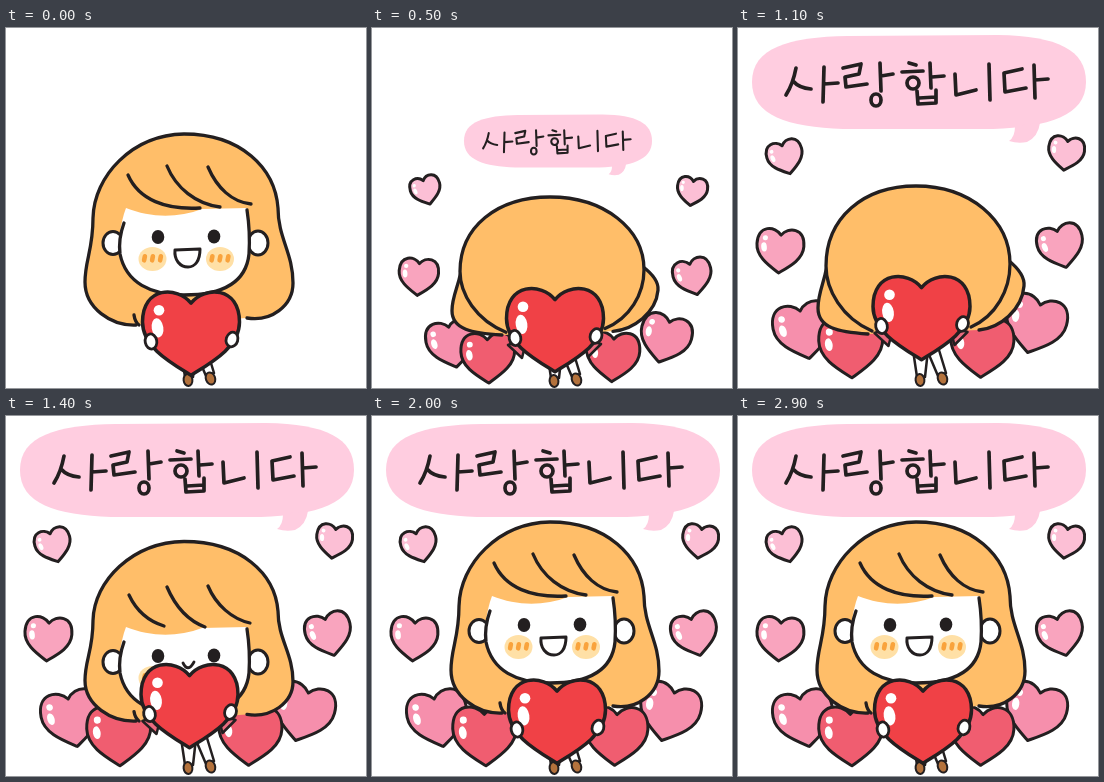
These frames come from a looping animation (360x360 px, 3.05 s). An HTML page with a canvas:

```html
<!DOCTYPE html>
<html lang="ko">
<head>
<meta charset="utf-8">
<style>
  html, body { margin: 0; width: 100%; height: 100%; overflow: hidden; background: #fff; }
  canvas { display: block; width: 360px; height: 360px; }
</style>
</head>
<body>
<canvas id="stage" width="360" height="360" role="img" aria-label="사랑합니다"></canvas>
<script>
const ctx = document.getElementById('stage').getContext('2d');
const INK = '#231f20', HAIR = '#ffbe69', PINK = '#ffcde0';
const LOOP = 3050, FIRST = 200, STEP = 150;

// top/bottom: vertical span of the hair; face: face offset; heart: heart centre
const POSES = {
  up:      { top: 106, bottom: 297, face: 0, heart: 305.5, x: 185 },
  stretch: { top: 100, bottom: 292, face: -6, heart: 299.5, x: 185 },
  half:    { top: 125.5, bottom: 305, face: 31, heart: 290, x: 183.5, shy: true },
  bow:     { top: 158, bottom: 306, heart: 290, x: 183.5, bowed: true },
  squash:  { top: 169, bottom: 307, heart: 302, x: 183, bowed: true }
};
const SEQUENCE = ['up', 'stretch', 'half', 'squash', 'bow', 'bow', 'bow', 'bow', 'squash', 'half', 'stretch', 'up'];

const HEART = new Path2D('M0-32C-14-50-50-50-50-12C-50 14-22 30 0 44C22 30 50 14 50-12C50-50 14-50 0-32Z');

// end position, start position, width, tilt in degrees, colour, sway direction
const HEARTS = [
  { x: 66, y: 303, x0: 80, y0: 316, w: 63, tilt: -11, color: '#f68fac', sway: 1 },
  { x: 297, y: 297, x0: 293, y0: 311, w: 64, tilt: 15, color: '#f68fac', sway: 1 },
  { x: 113, y: 320, x0: 116, y0: 330, w: 67, tilt: -2, color: '#f05d70', sway: -1 },
  { x: 244, y: 320, x0: 241, y0: 329, w: 66, tilt: 3, color: '#f05d70', sway: -1 },
  { x: 42, y: 223, x0: 46.5, y0: 249, w: 50, tilt: 4, color: '#f9a4be', sway: -1 },
  { x: 323, y: 218.5, x0: 321, y0: 249, w: 49, tilt: -14, color: '#f9a4be', sway: -1 },
  { x: 47.5, y: 129.5, x0: 54, y0: 162.5, w: 39, tilt: -16, color: '#fcbfd5', sway: 1 },
  { x: 328, y: 125.5, x0: 320, y0: 163.5, w: 39, tilt: 8, color: '#fcbfd5', sway: 1 }
];

const BUBBLE = 'M14 54C14 20 50 9 110 8L260 7C320 8 348 22 348 54C348 88 310 99 255 101L105 101C50 99 14 88 14 54Z';
const LETTERING = new Path2D(
  'M58 40Q55 56 48 67M55 53Q61 60 73 61M86 39L85 74M86 56L100 55' +
  'M105 40L123 36L121 46L107 49L108 59L129 56M142 35L143 63M143 48L155 46' +
  'M143 72A5 6 0 1 1 133 72A5 6 0 1 1 143 72' +
  'M171 35L178 37M164 44L185 43M181 55A6 6 0 1 1 169 55A6 6 0 1 1 181 55' +
  'M192 35L193 60M194 49L206 48M179 63L180 76L198 75L198 62M181 70L198 69' +
  'M217 46L218 67L238 62M251 36L252 72' +
  'M284 41L266 45L267 64L288 60M296 37L297 70M297 52L310 51');

function paint(path, fill, width = 3.3) {
  if (typeof path === 'string') path = new Path2D(path);
  if (fill) { ctx.fillStyle = fill; ctx.fill(path); }
  if (width) { ctx.strokeStyle = INK; ctx.lineWidth = width; ctx.stroke(path); }
}

function oval(x, y, rx, ry, fill, width = 0, angle = 0) {
  const path = new Path2D();
  path.ellipse(x, y, rx, ry, angle, 0, Math.PI * 2);
  paint(path, fill, width);
}

function group(draw) {
  ctx.save();
  draw();
  ctx.restore();
}

// Remaps a path from one vertical span to another, keeping stroke widths even.
function fit(d, from, to, pose) {
  const scale = (pose.bottom - pose.top) / (to - from);
  const path = new Path2D();
  path.addPath(new Path2D(d), new DOMMatrix([1, 0, 0, scale, 0, pose.top - from * scale]));
  return path;
}

function heart(x, y, w, h, tilt, color, width) {
  group(() => {
    ctx.translate(x, y);
    ctx.rotate(tilt * Math.PI / 180);
    const path = new Path2D();
    path.addPath(HEART, new DOMMatrix([w / 100, 0, 0, h / 100, 0, 0]));
    paint(path, color, width);
    oval(-w * .33, -h * .245, w * .055, w * .055, '#fff');
    oval(-w * .345, -h * .06, w * .06, w * .1, '#fff', 0, -.15);
  });
}

function sideHearts(step) {
  const grow = step === 3 ? 0 : step === 4 ? 1.15 : 1;
  const size = [.84, 1.04][step - 3] || 1;
  const sway = step > 5 ? 3 * Math.round(Math.sin((step - 5) * Math.PI / 2)) : 0;
  for (const h of HEARTS) {
    const x = h.x0 + (h.x - h.x0) * grow;
    const y = h.y0 + (h.y - h.y0) * grow + sway * h.sway;
    const w = (h.w - 3) * size;
    heart(x, y, w, w * 1.06, h.tilt, h.color, 3);
  }
}

function bubble(step) {
  const scale = [.563, 1.04][step - 3] || 1;
  group(() => {
    ctx.translate(step === 3 ? 186 : 181, step === 3 ? 113 : 54);
    ctx.scale(scale, scale);
    ctx.translate(-181, -54);
    paint(BUBBLE, PINK, 0);
    paint('M277 98Q277 109 271 113Q280 116 289 114Q300 109 302 95Z', PINK, 0);
    paint(LETTERING, null, 3.7);
  });
}

function legs() {
  paint('M175 322L179 349L187 349L190 322M189 322L200 348L208 345L201 322', '#fff', 2.5);
  oval(182, 352, 4.4, 6, '#b4723c', 2, -.1);
  oval(204.5, 350.5, 4.6, 6.2, '#b4723c', 2, -.35);
}

function cheek(x) {
  oval(x, 231, 14, 12, '#ffe0a6');
  ctx.strokeStyle = '#f9a33c';
  ctx.lineWidth = 4.6;
  for (const dx of [-8, 0, 8]) {
    ctx.beginPath();
    ctx.moveTo(x + dx + .4, 228.3);
    ctx.lineTo(x + dx - .4, 232.3);
    ctx.stroke();
  }
}

function face(pose) {
  ctx.translate(0, pose.face);
  oval(107, 215, 10, 11.5, '#fff', 3);
  oval(252, 215, 10, 12, '#fff', 3);
  paint('M120 180C114 196 112 215 114 226C120 255 145 268 178 268C215 268 240 255 243 226' +
        'C245 210 244 195 241 180L196 181C172 190 145 190 120 180Z', '#fff', 0);
  paint('M118 195C114 206 113 218 114 226C120 255 145 267 178 267C215 267 240 255 243 226C244 210 243 195 241 182');
  cheek(146.5);
  cheek(214);
  oval(152, 209, 6.3, 7, INK);
  oval(208, 208.5, 6.3, 7, INK);
  if (pose.shy) {
    paint('M177 216Q182 226 188 215', null, 2.8);
    paint('M123 148C131 165 142 174 158 179M161 140C170 161 183 174 199 180M202 139C210 158 226 172 244 176');
  } else {
    paint('M169 222L194 221C194 233 189 239 182 239C174 239 168 232 169 222Z', '#fff', 3);
    paint('M122 147C133 172 160 182 194 180M161 138C170 160 190 176 214 179M202 139C211 160 226 174 245 176');
  }
}

function head(pose) {
  if (pose.bowed) {
    paint(fit('M130 306C100 304 80 300 80 280C80 262 89 250 90 228L270 232' +
              'C280 240 287 248 286 258C284 282 262 300 241 302', 158, 306, pose), HAIR);
    paint(fit('M134 303C104 290 88 262 88 238C88 190 125 158 178 158' +
              'C232 158 272 192 272 236C272 262 258 288 233 299', 158, 306, pose), HAIR);
    return;
  }
  paint(fit('M130 297C105 298 79 280 79 254C79 232 87 222 87 190C88 148 126 107 178 106' +
            'C235 106 269 140 272 180C272 210 287 225 287 255C287 278 265 294 241 290', 106, 297, pose), HAIR);
  paint(fit('M128 287Q129 294 133 297', 106, 297, pose));
  group(() => face(pose));
}

function heldHeart(pose) {
  group(() => {
    ctx.translate(pose.x, pose.heart);
    if (pose.shy || pose.bowed) {
      paint('M-47 15L-33 28L-28 8Z', '#ec6b7f', 2.5);
      paint('M46 14L33 27L28 8Z', '#ec6b7f', 2.5);
    }
    heart(0, 0, 97, 95, 0, '#f04146', 3.5);
    oval(-40, 8, 5.8, 7.6, '#fff', 2.8, -.2);
    oval(41, 6, 5.8, 7.4, '#fff', 2.8, .3);
  });
}

function draw(time) {
  const t = time % LOOP;
  const step = t < FIRST ? 0 : 1 + Math.floor((t - FIRST) / STEP);
  const pose = POSES[SEQUENCE[step] || 'up'];
  ctx.fillStyle = '#fff';
  ctx.fillRect(0, 0, 360, 360);
  ctx.lineCap = ctx.lineJoin = 'round';
  if (step >= 3) {
    bubble(step);
    sideHearts(step);
  }
  group(() => {
    if (pose === POSES.squash) ctx.translate(0, 1);
    legs();
  });
  head(pose);
  heldHeart(pose);
}

const start = performance.now();
function tick() {
  draw(performance.now() - start);
  requestAnimationFrame(tick);
}
tick();
</script>
</body>
</html>
```
